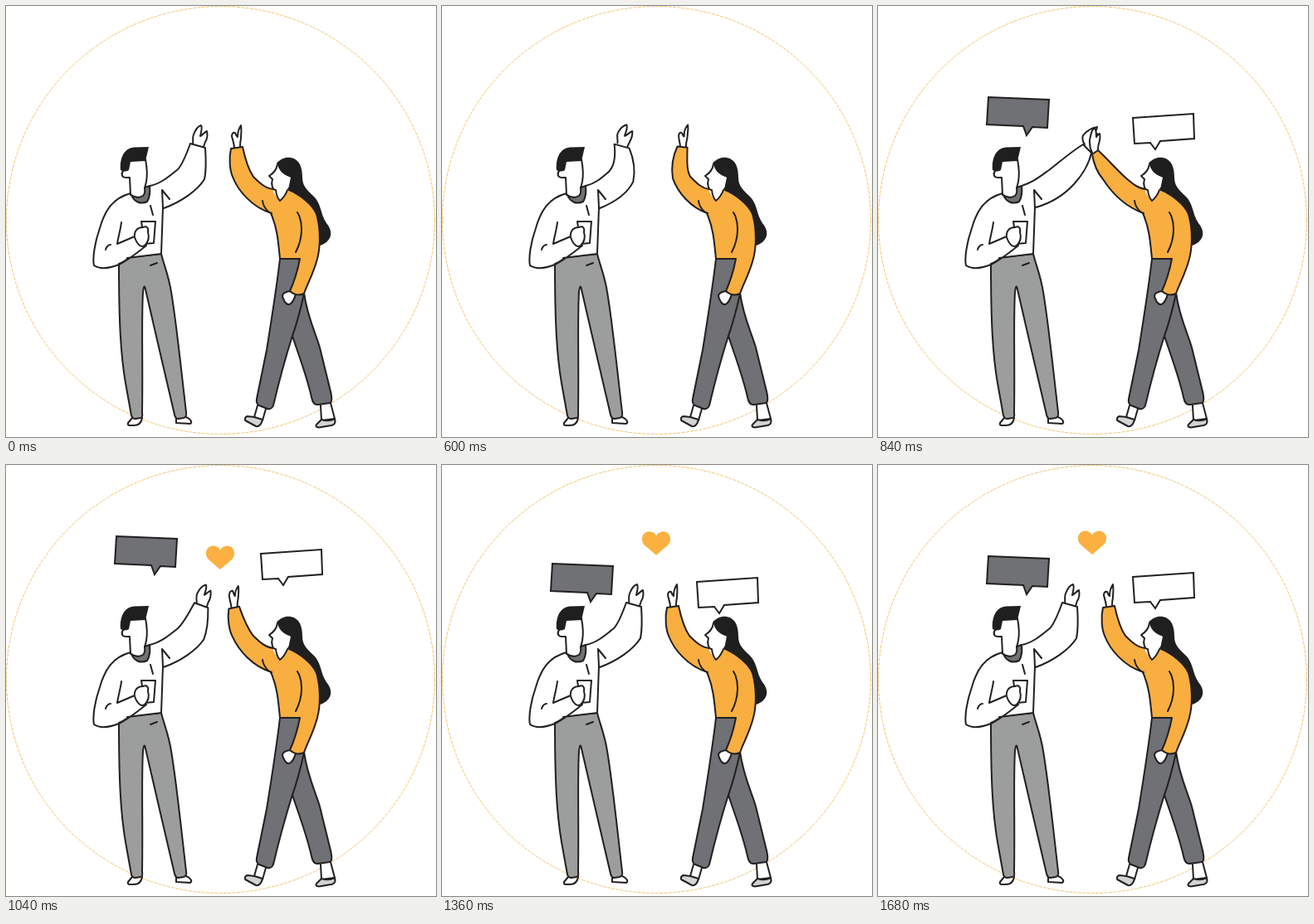
Animation of 518 by 520 pixels, one loop 1.76 s. Source, as an HTML page:

```html
<!DOCTYPE html>
<html lang="en">
<head>
<meta charset="utf-8">
<title>High five</title>
<style>
  html, body { margin: 0; width: 100%; height: 100%; overflow: hidden; background: #fff; }
  svg { display: block; width: 518px; height: 520px; }
  .line { fill: none; }
  .white { fill: #fff; }
  .orange { fill: #f9ae40; }
  .grey { fill: #9c9e9d; }
  .slate { fill: #707174; }
  .shoe { fill: #d1d3d4; }
  .ink { fill: #1f1f1f; }
  .bare { stroke: none; }
</style>
</head>
<body>
<svg viewBox="0 0 518 520" stroke="#231f20" stroke-width="2" stroke-linecap="round" stroke-linejoin="round">
  <circle class="line" cx="258.5" cy="258.5" r="258" stroke="#efb54c" stroke-width=".8" stroke-dasharray="4 1.3" stroke-linecap="butt"/>

  <path id="heart" class="bare" fill="#fbb040" d="M258 108 L244 96 C237 88 243 79 250 79.5 C254 80 257 82 258 85 C259 82 262 80 266 79.5 C273 79 279 88 272 96 Z"/>

  <g id="man">
    <path class="white" d="M152 497 L147 503 C146 507 150 506 154 506 C160 506 163 503 164 497"/>
    <path class="white" d="M205 497 L205 503 L222 504 C225 502 222 498 217 496"/>
    <path class="grey" d="M136 310 C136 380 138 420 144 455 L151 494 Q152 498 156 498 L162 497 Q165 497 164 490 C165 430 163 380 165 345 C166 337 167 337 168 342 L186 420 L203 493 Q204 498 208 498 L214 497 Q218 496 217 490 C210 430 205 380 199 345 C196 325 190 312 187 299 L148 303 Z"/>
    <path class="line" d="M174 313 L182 310"/>
    <path id="manHand" class="white"/>
    <path id="manArm" class="white"/>
    <path class="white bare" d="M150 226 C128 232 119 247 113 268 C107 285 104 304 107 313 Q122 321 148 303 L187 299 L189 243 L173 217 Z"/>
    <path class="line" d="M150 226 C128 232 119 247 113 268 C107 285 104 304 106 313 C115 319 126 316 136 312 C148 306 158 298 169 289 M146 304 L187 299 L189 243 L188 222 L197 233"/>
    <path class="line" d="M139 261 C138 270 135 279 134 287 L155 278 M120 294 Q122 288 126 288 M174 241 L177 252"/>
    <path class="white" d="M163 260 H180 L178 286 L167 287 Z"/>
    <path class="white" d="M155 279 C154 272 158 267 165 267 C170 265 172 268 171 273 C173 279 171 285 167 289 C163 292 158 288 155 279 Z"/>
    <path class="white bare" d="M143 197 C138 202 139 207 145 207 L149 207 L150 229 L167 229 L168 216 Q171 200 168 185 Z"/>
    <path class="slate" d="M151 228 C155 231 160 232 165 229 Q168 226 167 219 L173 217 C174 225 173 231 170 236 C162 240 154 236 151 228 Z"/>
    <path class="line" d="M142 198 C138 202 139 207 145 207 L149 207 L150 228 M168 185 Q171 201 169 212 L167 220"/>
    <path class="ink bare" d="M138 198 C137 185 141 172 154 170.500 L172 170 L168 187 L150 188 L148 198 Q143 201 138 198 Z"/>
  </g>

  <g id="woman">
    <path class="ink bare" d="M326 190 C331 184 337 182 343 183 C354 185 357 195 357 207 C357 218 364 223 371 230 C380 239 379 252 386 262 C393 270 393 279 386 285 Q381 289 375 290 L342 225 L338 207 C331 204 326 198 326 190 Z"/>
    <path class="white" d="M303 482 L299 496 L309 500 L313 486"/>
    <path class="shoe" d="M299 496 L291 495 C287 496 287 500 290 501 L301 507 C305 508 308 504 309 499 Z"/>
    <path class="white" d="M379 482 L380 500 L396 498 L391 479"/>
    <path class="shoe" d="M380 499 L374 505 C372 508 376 509 380 508 L392 506 C397 505 397 501 396 498 Q388 502 380 499 Z"/>
    <path class="slate" d="M345 398 C352 420 362 445 368 472 Q370 482 376 481 L390 479 Q394 478 391 465 L378 412 C372 392 363 375 359 346 Z"/>
    <path class="slate" d="M330 305 C326 340 318 390 314 415 L302 474 Q301 480 305 482 L315 486 Q320 487 322 482 C330 448 338 420 345 398 Q353 375 359 347 L354 305 Z"/>
    <path class="white" d="M344 344 C337 344 333 347 333 350 C334 354 337 361 341 360 C345 359 348 352 349 347"/>
    <path id="womanHand" class="white"/>
    <path class="orange bare" d="M320 221 L329 235 L339 221 C354 227 370 240 374 251 C379 268 379 290 375 305 C370 324 363 335 359 347 Q350 351 342 344 Q350 324 354 305 L330 305 C329 285 327 265 319 250 Z"/>
    <path id="womanArm" class="orange"/>
    <path class="line" d="M319 250 C327 268 328 285 330 305 L354 305 Q350 326 342 344 Q350 351 359 347 C363 335 370 324 375 305 C379 290 379 268 374 251 C370 240 354 227 339 221"/>
    <path class="line" d="M351 249 C358 260 358 280 349 297 M309 235 Q310 243 317 249"/>
    <path class="white" d="M327 190 C326 197 322 202 317 205 L322 209 C319 214 320 222 325 222 L326 231 L330 235 Q336 230 340 221 L343 207 Z" stroke="none"/>
    <path class="line" d="M327 191 C326 197 322 202 317 205 L321 209 C319 215 321 222 325 222 Q326 231 330 235 Q336 230 339 222"/>
    <path class="ink bare" d="M327 188 C327 198 334 204 344 207 C344 212 342 217 339 221 L350 226 L356 205 L345 186 Z"/>
  </g>

  <path id="darkBubble" class="slate" stroke-linejoin="miter" d="M133 110 L206 113 L204 147 L186 146 L179 156 L175 145 L131 143 Z"/>
  <path id="lightBubble" class="white" stroke-linejoin="miter" d="M307 135 L380 130 L381 160 L340 163 L334 173 L328 165 L309 166 Z"/>
</svg>

<script>
const LOOP = 1760, STEP = 40;
const $ = id => document.getElementById(id);

// Three poses per limb: at rest, drawn back, clapping
const limbs = {
  manArm: [
    'M173 217 C185 215 195 207 207 197 C213 191 218 177 222 166 L240 171 C241 186 241 200 239 209 C231 222 212 236 190 244',
    'M173 217 C184 214 189 209 198 201 C205 193 204 183 199 167 L217 172 C225 184 228 200 225 214 C219 228 206 237 190 244',
    'M173 217 C186 213 192 208 206 198 C220 187 234 175 247 167 L257 177 C254 192 246 204 236 215 C224 228 208 238 190 243'
  ],
  manHand: [
    'M225 167 C226 163 224 160 226 155 C228 150 231 145 235 144 C237 147 235 152 234 157 C237 156 239 152 242 151 C243 156 242 161 240 164 L238 170',
    'M203 167 C203 162 200 159 201 155 C203 150 206 146 211 144 C213 148 211 152 210 158 C213 157 215 153 219 151 C220 156 218 161 217 164 L215 170',
    'M249 167 C246 163 246 159 247 156 C251 151 257 147 264 146 C264 150 261 152 259 156 C260 155 262 154 264 154 C264 160 261 166 259 170 L257 176'
  ],
  womanArm: [
    'M322 221 C312 220 305 213 298 206 C291 196 288 184 285 170 L271 172 C268 185 270 199 273 206 C279 222 296 243 320 250',
    'M322 221 C313 220 308 214 300 206 C296 199 300 183 302 171 L291 168 C283 181 280 195 281 209 C287 227 302 244 320 250',
    'M322 221 C313 220 306 214 297 206 C286 196 276 184 265 174 L258 179 C260 191 265 202 271 209 C284 229 300 243 320 250'
  ],
  womanHand: [
    'M275 171 C275 166 273 162 272 157 C272 154 274 152 276 153 C277 155 277 157 279 158 C279 152 281 147 283 144 C284 150 283 156 283 160 C282 164 282 167 282 170',
    'M294 168 C294 164 292 160 293 155 C294 152 296 152 297 154 C298 155 298 156 299 157 C299 152 301 146 304 143 C305 148 303 154 303 158 C302 162 301 166 301 170',
    'M258 177 C255 171 254 164 256 157 C257 152 259 148 261 147 C263 150 263 155 263 158 C264 156 265 155 267 154 C268 158 267 163 266 166 C265 169 265 172 265 174'
  ]
};

const linear = p => p;
const sine = p => (1 - Math.cos(Math.PI * p)) / 2;

// Value at time t on a list of [time, value] keys
function track(t, keys, ease = linear) {
  if (t <= keys[0][0]) return keys[0][1];
  for (let i = 1; i < keys.length; i++) {
    const [t0, a] = keys[i - 1], [t1, b] = keys[i];
    if (t < t1) return a + (b - a) * ease((t - t0) / (t1 - t0));
  }
  return keys[keys.length - 1][1];
}

function mix(a, b, p) {
  const end = b.match(/\d+/g);
  let i = 0;
  return a.replace(/\d+/g, n => (+n + (end[i++] - n) * p).toFixed(2));
}

function place(el, x, y, dy, scale) {
  el.style.display = scale > 0 ? '' : 'none';
  el.setAttribute('transform', `translate(${x} ${y + dy}) scale(${scale}) translate(${-x} ${-y})`);
}

function draw(t) {
  // -1 is drawn back, 0 at rest, 1 clapping
  const swing = track(t, [[400, 0], [720, -1], [840, 1], [1090, 0]]);
  const fromBack = t > 720 && t < 840;
  for (const id in limbs) {
    const [rest, back, clap] = limbs[id];
    const d = fromBack ? mix(back, clap, (swing + 1) / 2)
      : mix(rest, swing < 0 ? back : clap, Math.abs(swing));
    $(id).setAttribute('d', d);
  }
  const wrist = track(t, [[400, 0], [440, 13], [720, 0]]);
  $('manHand').setAttribute('transform', `rotate(${wrist} 228 168)`);

  const bob = (up, down) => track(t, [[840, 0], [1040, up], [1360, down], [1680, 0]], sine);
  const pop = track(t, [[715, 0], [840, 1]]);
  place($('darkBubble'), 169, 132, bob(-24, 9), pop);
  place($('lightBubble'), 344, 151, bob(-28, 6), pop);

  const left = 1 - track(t, [[840, 0], [1520, 1]]);
  place($('heart'), 258, 94, 51 * left ** 3, track(t, [[840, 0], [960, 1]]));
}

const start = performance.now();
function tick() {
  const t = (performance.now() - start) % LOOP;
  draw(Math.floor(t / STEP) * STEP);
  requestAnimationFrame(tick);
}
tick();
</script>
</body>
</html>
```
